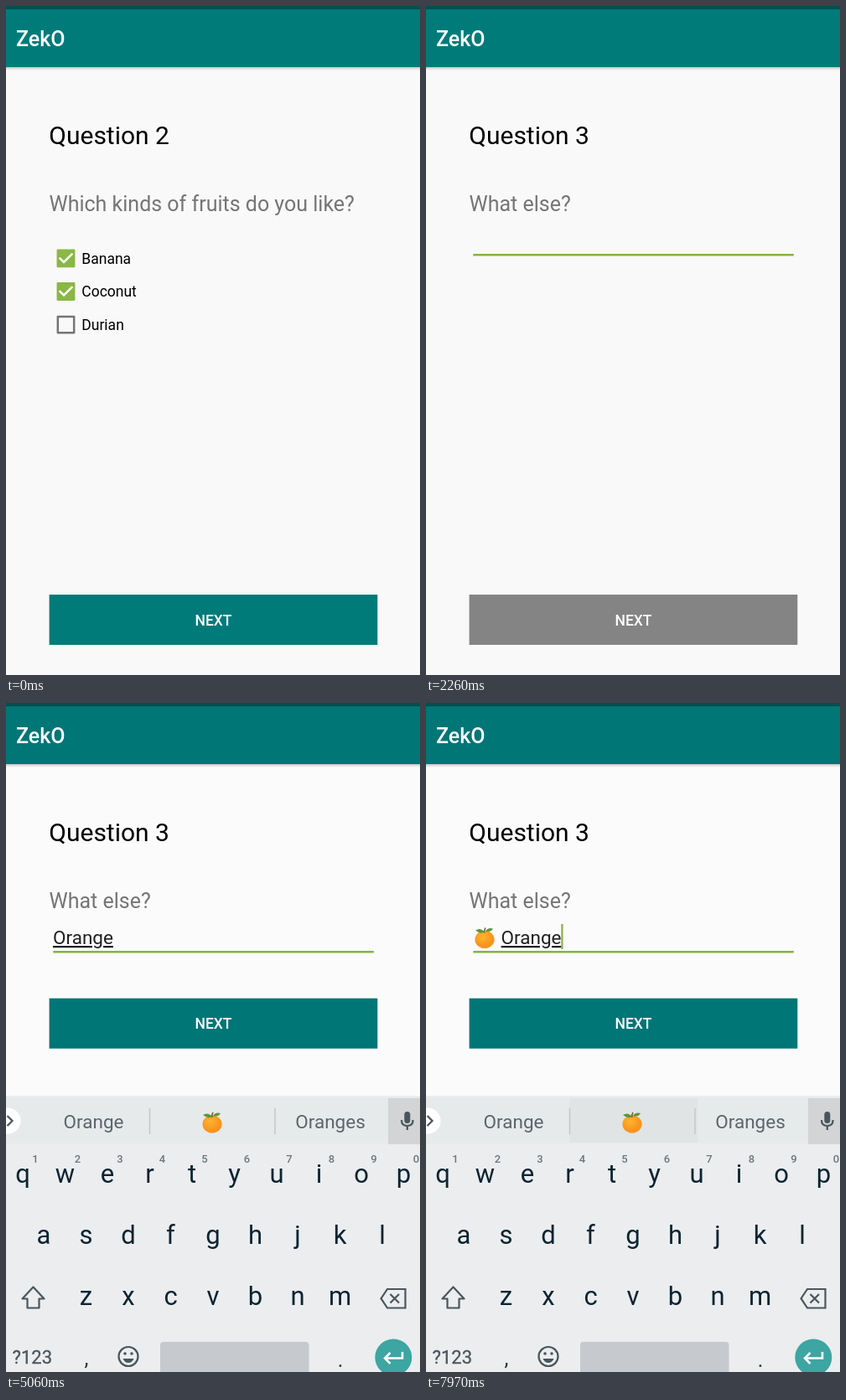
Recreate the animation shown at these times as an HTML page. Size 494 px wide and 799 px high, loop 8 s.

```html
<!DOCTYPE html>
<html lang="en">
<head>
<meta charset="utf-8">
<title>Survey</title>
<style>
  html, body { margin: 0; width: 100%; height: 100%; overflow: hidden; }
  svg { display: block; width: 494px; height: 799px; font-family: Roboto, "Noto Sans", sans-serif;
    --page: #f9f9f9; --teal: #007b7a; --off: #848484; --green: #84b444; }
  svg.typing { --page: #fbfbfb; --teal: #007677; --off: #797979; }
  .page { fill: var(--page); }
  .bar, .go { fill: var(--teal); }
  .go.off { fill: var(--off); }
  .go.down { fill: #33918f; }
  .medium { font-weight: 500; fill: #fff; }
  .title { font-size: 30px; }
  .ask { font-size: 25px; fill: #757575; }
  .option { font-size: 17.5px; }
  .entry { font-size: 22.5px; fill: #212121; }
  .line { fill: none; stroke: #49565c; stroke-width: 2.2; }
  .mid text { text-anchor: middle; }
  #words { font-size: 22.5px; fill: #5b666b; }
  #words .bold { font-weight: 700; fill: #000; }
  #keys { font-size: 31px; fill: #0c2431; }
  #digits { font-size: 13px; font-weight: 500; fill: #6c777c; }
  [hidden] { display: none; }
</style>
</head>
<body>
<svg id="stage" viewBox="0 0 494 799">
  <defs>
    <linearGradient id="shade" x2="0" y2="1">
      <stop stop-opacity=".2"/><stop offset="1" stop-opacity="0"/>
    </linearGradient>
    <radialGradient id="peel" cx=".4" cy=".35">
      <stop stop-color="#ffb52e"/><stop offset="1" stop-color="#f8941f"/>
    </radialGradient>
    <g id="fruit">
      <ellipse cx="12" cy="15" rx="11.6" ry="10.6" fill="url(#peel)"/>
      <path d="M12 7Q11 4 13 1" fill="none" stroke="#7a6434" stroke-width="1.6"/>
      <path d="M12 6Q7 9 1 4Q7 0 12 6ZM13 5Q16 0 22 2Q19 7 13 5Z" fill="#5d9440"/>
    </g>
    <g id="box">
      <path id="frame" d="M4.25 4.25H19.75V19.75H4.25Z" stroke-width="2" stroke-linejoin="round"/>
    </g>
  </defs>

  <rect class="page" width="494" height="799"/>
  <rect y="73" width="494" height="4" fill="url(#shade)"/>
  <rect class="bar" width="494" height="73"/>
  <rect width="494" height="4" fill="#005050"/>
  <text class="medium" x="12" y="48" font-size="25">ZekO</text>
  <text class="title" id="title" x="51.3" y="165"></text>
  <text class="ask" id="ask" x="51.5" y="245"></text>

  <g id="choices"></g>

  <g id="field">
    <rect id="rule" x="56.3" width="382.5"/>
    <use href="#fruit" id="typedFruit" x="58" y="267.5"/>
    <text class="entry" id="entry" y="288" text-decoration="underline"></text>
    <rect id="caret" y="264" width="2.2" height="30" fill="var(--green)"/>
  </g>

  <g id="next">
    <rect class="go" id="go" x="51.6" y="703" width="391.7" height="60"/>
    <text class="medium" x="247.5" y="739.7" font-size="17.5" text-anchor="middle">NEXT</text>
  </g>

  <g id="board">
    <rect y="469" width="494" height="330" fill="#ebedef"/>
    <rect y="471" width="494" height="55" fill="#e7eaeb"/>
    <rect id="tint" x="171" y="472" width="153" height="53" fill="#e0e4e5"/>
    <path d="M171.5 484V515M321 484V515" stroke="#c3c8ca" stroke-width="1.5"/>
    <rect x="456" y="472" width="38" height="55" fill="#d2d4d5"/>
    <circle cx="2" cy="499" r="15.5" fill="#fff"/>
    <path class="line" d="M1.5 493L7.5 499L1.5 505" stroke-width="2.5"/>
    <rect x="475.3" y="488" width="7" height="14" rx="3.5" fill="#49565c"/>
    <path class="line" d="M472 498Q472 505 478.8 505Q485.6 505 485.6 498M478.8 505V510"/>
    <g class="mid">
      <g id="words">
        <text x="104.5" y="508"></text>
        <text x="245.5" y="508"></text>
        <text x="387" y="508"></text>
      </g>
      <g id="keys"></g>
      <g id="digits"></g>
    </g>
    <use href="#fruit" id="wordFruit" x="234" y="488"/>
    <path class="line" id="shift" d="M32.5 697.5L45.5 711.5H39.5V722.5H25.5V711.5H19.5Z" stroke-linejoin="round"/>
    <path class="line" d="M455 700H476.5V722.5H455L447.5 711.2ZM458.5 706L469 716.5M469 706L458.5 716.5"/>
    <text x="7.5" y="789" font-size="22" fill="#49565c" stroke="#49565c" stroke-width=".3">?123</text>
    <g class="mid" font-size="25" fill="#26373f">
      <text x="96" y="791">,</text>
      <text x="399" y="793">.</text>
    </g>
    <circle class="line" cx="146" cy="780.5" r="11.5"/>
    <circle cx="142" cy="777" r="1.8" fill="#49565c"/>
    <circle cx="150" cy="777" r="1.8" fill="#49565c"/>
    <path d="M139.5 783H152.5Q150.5 788 146 788Q141.5 788 139.5 783Z" fill="#49565c"/>
    <rect x="184" y="763" width="177.5" height="40" rx="4" fill="#c6c9ce"/>
    <circle cx="462.3" cy="781.5" r="22" fill="#3da5a2"/>
    <path d="M473 775V782.5H452M458.5 776L452 782.5L458.5 789" fill="none" stroke="#fff" stroke-width="2.6"/>
  </g>
</svg>
<script>
  const LOOP = 8000;
  const $ = id => document.getElementById(id);
  const show = (id, on) => $(id).toggleAttribute('hidden', !on);

  // Each list holds [start time, value]; the last one that has started counts.
  const at = (list, t) => list.findLast(([start]) => t >= start)[1];

  const FRUIT = '*';
  const words = [
    [0, 'what I thanks'],
    [3560, 'Or Orange It\'s'],
    [3720, 'Ora Orange It\'s'],
    [3960, 'Oran Orange It\'s'],
    [4090, 'Oran Orange Oranges'],
    [4320, 'Orang Orange Oranges'],
    [4550, 'Orange * Oranges'],
    [5660, 'of you I'],
    [7150, 'Orange * Oranges']
  ];
  const entries = [
    [0, ''], [3390, 'O'], [3500, 'Or'], [3610, 'Ora'], [3730, 'Oran'],
    [3910, 'Orang'], [4140, 'Orange'], [5540, FRUIT], [7050, FRUIT + 'Orange']
  ];
  const caret = [
    [0, false], [2300, true], [2500, false], [3000, true], [5060, false],
    [5540, true], [6040, false], [6540, true], [7470, false], [7970, true]
  ];

  $('choices').innerHTML = ['Banana', 'Coconut', 'Durian'].map((name, i) => {
    const y = 301.4 + i * 39.6, on = i < 2;
    const color = on ? '#8ab746' : '#757575';
    return `<g transform="translate(56.5 ${y - 15}) scale(1.25)">
      <use href="#box" fill="${on ? color : 'none'}" stroke="${color}"/>
      ${on ? '<path d="M5.7 11.3L10 15.6L18.3 7.3" fill="none" stroke="#fff" stroke-width="2"/>' : ''}
      </g><text class="option" x="90.3" y="${y + 6.4}">${name}</text>`;
  }).join('');

  const row = (chars, x, y) => [...chars].map((c, i) =>
    `<text x="${x + i * 50.5}" y="${y}">${c}</text>`).join('');
  $('keys').innerHTML = row('qwertyuiop', 20, 573) + row('asdfghjkl', 45, 646) + row('zxcvbnm', 95.5, 719);
  $('digits').innerHTML = row('1234567890', 35, 549);
  const letters = [...$('keys').children].map(el => [el, el.textContent]);
  const slots = [...$('words').children];

  function drawField(t) {
    const value = at(entries, t), focus = t >= 2260;
    const fruit = value.startsWith(FRUIT), text = value.replace(FRUIT, '');
    const x = fruit ? (text ? 89.6 : 83.8) : 56;
    show('typedFruit', fruit);
    $('entry').textContent = text;
    $('entry').setAttribute('x', x);
    const end = text ? x + $('entry').getComputedTextLength() : x;
    $('caret').setAttribute('x', end - .2);
    show('caret', at(caret, t));
    $('rule').setAttribute('y', focus ? 296 : 296.4);
    $('rule').setAttribute('height', focus ? 2.5 : 1.4);
    $('rule').setAttribute('fill', focus ? 'var(--green)' : '#808080');
    return value;
  }

  function drawBoard(t) {
    const p = Math.min(1, Math.max(0, (t - 2400) / 200));
    $('board').setAttribute('transform', `translate(0 ${330 * (1 - p) ** 2})`);
    show('board', p > 0);
    show('tint', t >= 5340);

    const shifted = t >= 3290 && t < 3420;
    $('shift').style.fill = shifted ? '#49565c' : 'none';
    for (const [el, c] of letters) el.textContent = shifted ? c.toUpperCase() : c;

    const list = at(words, t).split(' ');
    slots.forEach((el, i) => { el.textContent = list[i] === FRUIT ? '' : list[i]; });
    slots[1].classList.toggle('bold', list[1] === 'Orange');
    show('wordFruit', list[1] === FRUIT);
  }

  function draw(t) {
    const second = t >= 1850, up = t >= 2400;
    $('stage').classList.toggle('typing', up);
    $('title').textContent = 'Question ' + (second ? 3 : 2);
    $('ask').textContent = second ? 'What else?' : 'Which kinds of fruits do you like?';
    show('choices', !second);
    show('field', second);
    const value = drawField(t);
    $('next').setAttribute('transform', `translate(0 ${up ? -350.3 : 0})`);
    $('go').classList.toggle('off', second && !value);
    $('go').classList.toggle('down', t >= 440 && t < 540);
    drawBoard(t);
  }

  const begin = performance.now();
  function tick() {
    draw((performance.now() - begin) % LOOP);
    requestAnimationFrame(tick);
  }
  tick();
</script>
</body>
</html>
```
